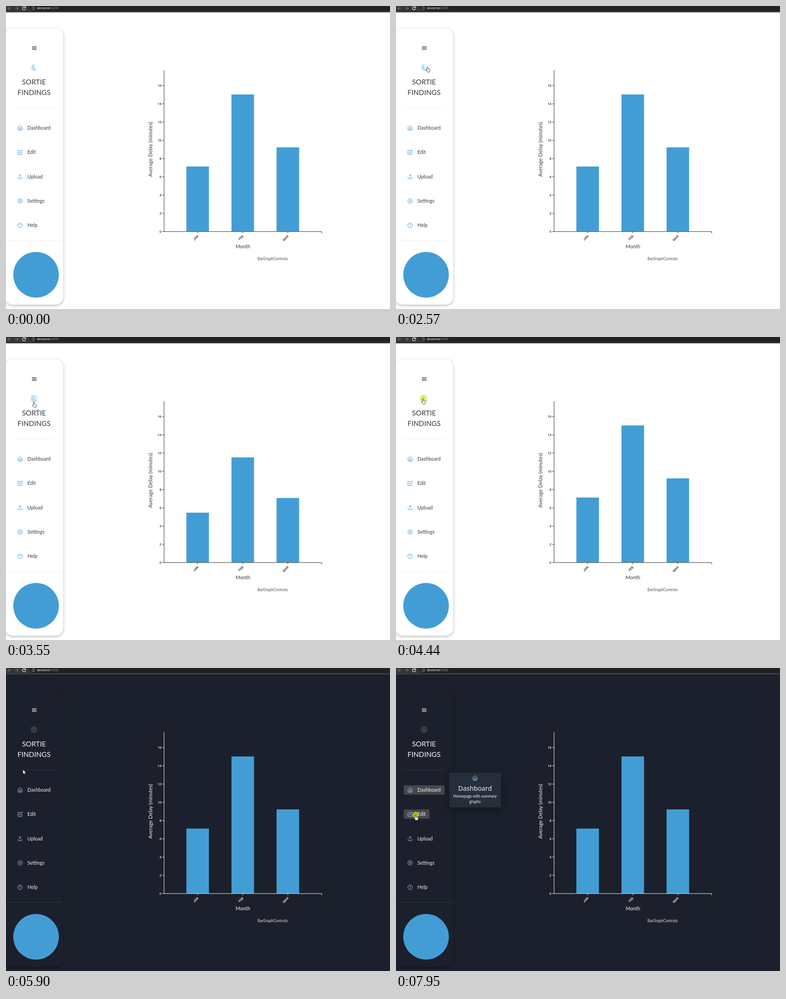
An HTML page that plays this animation: 843 px wide and 664 px high, repeating every 8000 ms.

```html
<!DOCTYPE html>
<html lang="en">
<head>
<meta charset="utf-8">
<title>Delay dashboard</title>
<style>
  html, body { margin: 0; width: 100%; height: 100%; overflow: hidden; }
  svg { display: block; }
  #stage {
    --page: #fff; --ink: #393b41; --axis: #2a2a2a; --rule: #eef0f2;
    --icon: #4299e1; --shadow: rgba(0, 0, 0, .28); --hover: #e6eaf0;
    font-family: Lato, sans-serif; fill: var(--ink);
  }
  #stage.dark {
    --page: #1c202c; --ink: #f4f5f7; --axis: #f4f5f7; --rule: #30343f;
    --icon: #90cdf4; --shadow: rgba(0, 0, 0, .3); --hover: #3d4048;
  }
  .page { fill: var(--page); }
  .card { fill: var(--page); filter: drop-shadow(0 2px 3px var(--shadow)); }
  .rule { stroke: var(--rule); }
  .icon { fill: none; stroke: var(--icon); stroke-width: 2; stroke-linecap: round; stroke-linejoin: round; }
  .axis { fill: none; stroke: var(--axis); stroke-width: 1; }
  .tick { font: 500 7px Roboto, sans-serif; fill: var(--axis); text-anchor: end; }
  .mid { text-anchor: middle; }
  .bar { fill: #439dd5; }
  .chrome { fill: none; stroke-width: 1; stroke: #85878a; }
  .pointer { fill: #fff; stroke: #1b1b1b; stroke-width: .8; stroke-linejoin: round; }
  #tip { filter: drop-shadow(0 6px 8px rgba(0, 0, 0, .35)); }
</style>
</head>
<body>
<svg id="stage" width="843" height="664" viewBox="0 0 843 664"></svg>
<script>
const LOOP = 8000;
const LEFT = 347, BASE = 493.8, UNIT = 20;
const months = [['JAN', 7.1], ['FEB', 15], ['MAR', 9.2]];

// Closed outline whose radius ripples around a centre of 12,12
function gear(teeth, radius, depth) {
  const points = Array.from({ length: 72 }, (_, i) => {
    const a = i / 72 * 2 * Math.PI;
    const r = radius + depth * Math.cos(teeth * a);
    return `${(12 + r * Math.cos(a)).toFixed(2)} ${(12 + r * Math.sin(a)).toFixed(2)}`;
  });
  return `M${points.join('L')}Z`;
}
const ring = r => `M${12 - r} 12a${r} ${r} 0 1 0 ${2 * r} 0a${r} ${r} 0 1 0 ${-2 * r} 0`;

const icons = {
  Dashboard: 'M3 9l9-7 9 7v11a2 2 0 0 1-2 2H5a2 2 0 0 1-2-2zM9 22V12h6v10',
  Edit: 'M11 4H4a2 2 0 0 0-2 2v14a2 2 0 0 0 2 2h14a2 2 0 0 0 2-2v-7M18.5 2.5a2.1 2.1 0 0 1 3 3L12 15l-4 1 1-4z',
  Upload: 'M21 15v4a2 2 0 0 1-2 2H5a2 2 0 0 1-2-2v-4M17 8l-5-5-5 5M12 3v12',
  Settings: gear(8, 9.8, 1.4) + ring(3.4),
  Help: ring(10) + 'M9.1 9a3 3 0 0 1 5.8 1c0 2-3 3-3 3M12 17h.01'
};
const icon = (name, x, y) =>
  `<path class="icon" d="${icons[name]}" transform="translate(${x - 6} ${y - 6}) scale(.5)"/>`;
const text = (x, y, size, label, attrs = '') =>
  `<text x="${x}" y="${y}" font-size="${size}" ${attrs}>${label}</text>`;

const menu = Object.keys(icons).map((name, i) => {
  const y = 267 + i * 53.4;
  return icon(name, 31, y) + text(47, y + 3.7, 10.7, name);
}).join('');

const yTicks = Array.from({ length: 9 }, (_, i) => {
  const y = BASE - i * 2 * UNIT;
  return `<path class="axis" d="M343 ${y + .5}h4"/><text class="tick" x="341" y="${y + 2.7}">${i * 2}</text>`;
}).join('');

const columns = months.map(([name], i) => {
  const x = 396 + i * 99;
  return `<rect class="bar" x="${x}" width="49.5"/>
    <path class="axis" d="M${x + 24.8} ${BASE}v4"/>
    <text class="tick" transform="translate(${x + 27} 505) rotate(-45)">${name}</text>`;
}).join('');

const browserBar = `
  <rect width="843" height="14" fill="#35363a"/>
  <rect x="51" y="-9" width="810" height="20" rx="10" fill="#202124"/>
  <path d="M0 13.5H843" stroke="#4b4c50"/>
  <path class="chrome" d="M11 5H4M7 1.8 3.8 5 7 8.2M20 5h7M24 1.8 27.2 5 24 8.2"/>
  <path class="chrome" style="stroke:#f1f1f1;stroke-width:1.2" d="M42.4 2.8A3.5 3.5 0 1 0 43 6M43 1.2v2.6h-2.6"/>
  <path class="chrome" style="stroke:#aaa;stroke-width:.8" d="M56.8 5a3.2 3.2 0 1 0 6.4 0a3.2 3.2 0 1 0-6.4 0M60 4.6v2.2M60 3v.8"/>
  <text x="68" y="7.3" font-family="Roboto, sans-serif" font-size="6.9" fill="#f1f1f1">devserver<tspan fill="#8e9093">:4200</tspan></text>`;

const stage = document.getElementById('stage');
stage.innerHTML = `
  <rect class="page" width="843" height="664"/>
  <rect class="card" x="-2" y="49" width="127.5" height="605.5" rx="17"/>
  <path class="axis" d="M57 89.3h10M57 92.3h10M57 95.3h10" style="stroke-width:1.2"/>
  <rect id="toggleHover" x="54" y="127" width="15" height="15" rx="2" fill="var(--hover)"/>
  <path id="moon" d="M63.5 127.2A7.4 7.4 0 1 0 69 138.6A7 7 0 0 1 63.5 127.2Z" fill="#b9def5"/>
  <g id="sun" transform="translate(53.5 127) scale(.667)" fill="none" stroke="#555a66" stroke-width="1.5">
    <path d="${gear(8, 8.8, 2.2)}${ring(4.4)}"/><circle cx="12" cy="12" r="1"/>
  </g>
  <g class="mid">${text(61.5, 172, 15.5, 'SORTIE')}${text(61.5, 194.7, 15.5, 'FINDINGS')}</g>
  <path class="rule" d="M16 223.5H107M0 513.5H125"/>
  <rect id="dashHover" x="17" y="257" width="89.5" height="20.5" rx="2.5" fill="#45474b"/>
  <rect id="editHover" x="17" y="310" width="56.5" height="20.5" rx="2.5" fill="#45474b"/>
  ${menu}
  <circle cx="66" cy="589" r="50" fill="#439dd5"/>
  <g id="chart">
    ${columns}${yTicks}
    <path class="axis" d="M${LEFT} 140.5V${BASE + .5}H693V498"/>
    <g class="mid">
      ${text(520, 531, 10.9, 'Month')}
      ${text(0, 0, 11.4, 'Average Delay (minutes)', 'transform="translate(321 314) rotate(-90)"')}
    </g>
  </g>
  ${text(552, 557, 8.4, 'BarGraphControls', 'font-family="Roboto, sans-serif" opacity=".88"')}
  <g id="tip" class="mid">
    <rect x="117" y="229.5" width="113.5" height="76" rx="3" fill="#262d3b"/>
    ${icon('Dashboard', 173.5, 241)}
    ${text(173.5, 268.5, 14.3, 'Dashboard', 'font-family="Noto Sans, sans-serif"')}
    ${text(173.5, 284, 8.5, 'Homepage with summary')}
    ${text(173.5, 296.3, 8.5, 'graphs')}
  </g>
  ${browserBar}
  <g id="cursor">
    <circle id="click" r="7" fill="#f0ea00" opacity=".65"/>
    <path id="arrow" class="pointer" d="M0 0V10L2.4 7.8 4 11.4 5.4 10.8 3.9 7.3H7Z"/>
    <path id="hand" class="pointer" transform="translate(-3.2 0)"
      d="M2.2 1.2a1 1 0 0 1 2 0V4.6l3.6.9q1.3.4 1.1 1.7L8.2 11.8H3.4L.4 7.8q-.4-1 .6-1.2l1.2.8z"/>
  </g>`;

const el = id => document.getElementById(id);
const bars = stage.querySelectorAll('.bar');
const clamp = v => Math.min(1, Math.max(0, v));
const cubicInOut = v => v < .5 ? 4 * v ** 3 : 1 - 4 * (1 - v) ** 3;
const within = (t, ...spans) => spans.some(([from, to]) => t >= from && t < to);
const show = (id, visible) => el(id).setAttribute('visibility', visible ? 'visible' : 'hidden');

// time, x, y of the pointer's hot spot
const route = [
  [320, 814, 650], [1070, 58, 20], [1140, 56, 18], [1340, 40, 6], [2300, 40, 6],
  [2570, 69, 133], [2640, 64, 140], [3050, 61, 142], [3550, 61, 142], [4040, 59, 135],
  [5400, 59, 135], [5800, 34, 210], [6180, 52, 282], [6450, 57, 270],
  [7410, 57, 270], [7880, 43, 322], [LOOP, 43, 322]
];
function pointerAt(t) {
  const i = Math.max(1, route.findIndex(([time]) => time > t));
  const [t0, x0, y0] = route[i - 1], [t1, x1, y1] = route[i];
  const k = clamp((t - t0) / (t1 - t0));
  const s = k * k * (3 - 2 * k);
  return [x0 + (x1 - x0) * s, y0 + (y1 - y0) * s];
}

// Bars regrow after the page reload and again after the theme switch
function growth(t) {
  if (t < 2640) return 1;
  return cubicInOut(clamp(t < 4780 ? (t - 2896) / 1070 : (t - 4720) / 900));
}

function draw(t) {
  const dark = t >= 4710;
  stage.classList.toggle('dark', dark);
  show('moon', !dark);
  show('sun', dark);
  show('toggleHover', within(t, [2640, 5460]));
  show('dashHover', t >= 6250);
  show('editHover', t >= 7640);
  show('chart', !within(t, [2640, 2780]));

  const grown = growth(t);
  bars.forEach((bar, i) => {
    const height = months[i][1] * UNIT * grown;
    bar.setAttribute('y', BASE - height);
    bar.setAttribute('height', height);
  });

  const open = 1 - (1 - clamp((t - 6380) / 300)) ** 2;
  const scale = .8 + .2 * open;
  el('tip').setAttribute('opacity', open);
  el('tip').setAttribute('transform', `translate(117 267) scale(${scale}) translate(-117 -267)`);

  const hand = within(t, [2540, 5460], [6250, 7500], [7640, LOOP]);
  el('cursor').setAttribute('transform', `translate(${pointerAt(t)})`);
  show('hand', hand);
  show('arrow', t >= 320 && !hand);
  show('click', within(t, [1550, 1960], [4440, 4710], [7900, LOOP]));
}

function frame() {
  draw(performance.now() % LOOP);
  requestAnimationFrame(frame);
}
frame();
</script>
</body>
</html>
```
